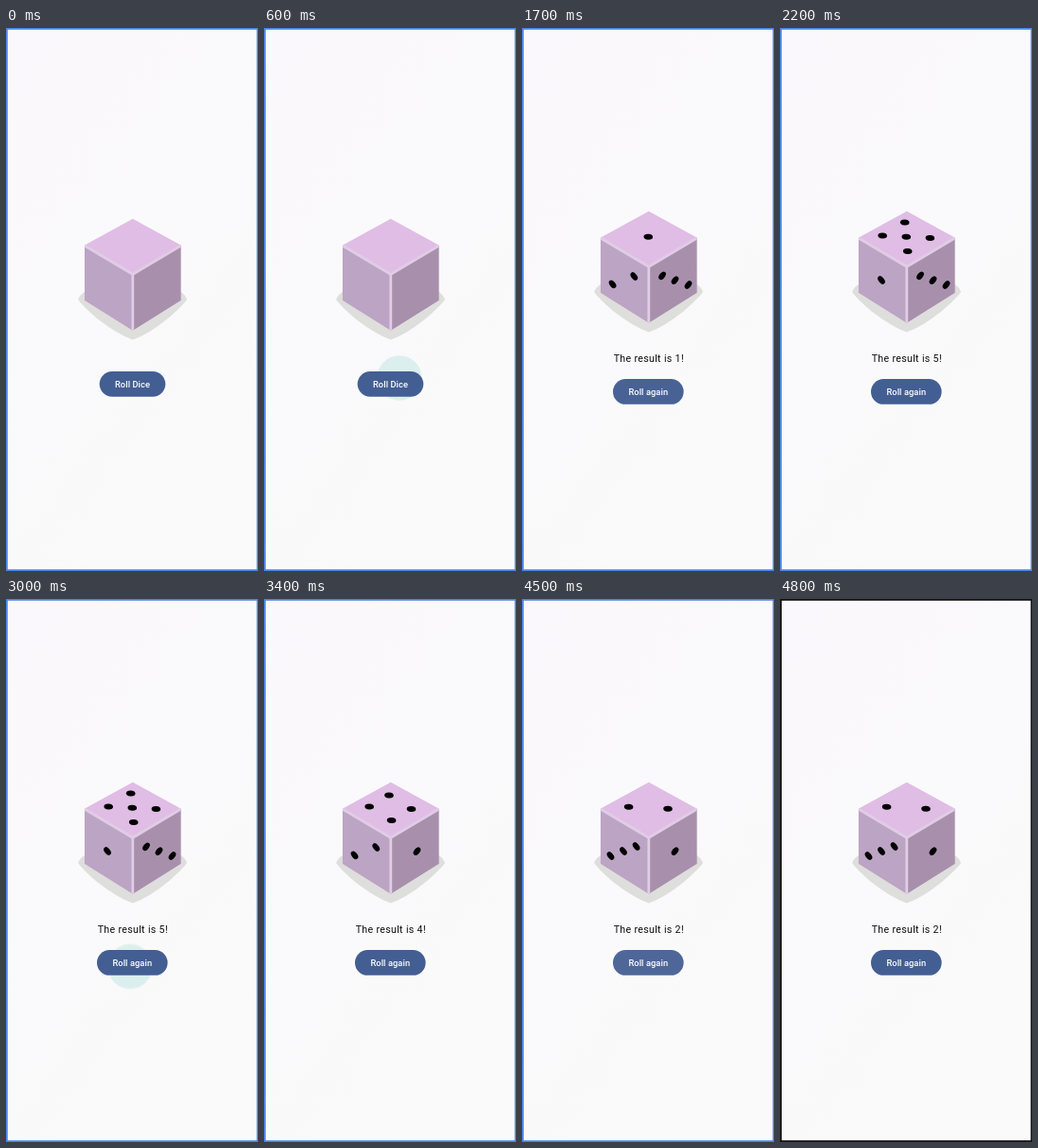
An HTML page that plays this animation: 266 px wide and 574 px high, repeating every 5.5 s.

```html
<!DOCTYPE html>
<html lang="en">
<head>
<meta charset="utf-8">
<title>Roll Dice</title>
<style>
  html, body { margin: 0; width: 100%; height: 100%; overflow: hidden; background: #faf9fb; }
  svg { display: block; width: 100vw; height: 100vh; }
  text { font-family: Roboto, "Open Sans", sans-serif; text-anchor: middle; }
  .label { font-size: 9.3px; font-weight: 500; letter-spacing: .07px; fill: #fff; }
  .result { font-size: 10.64px; letter-spacing: .33px; fill: #101010; }
  .timed { animation: 5.5s step-end infinite; }

  .die { animation-name: lift; }
  .start { animation-name: start; }
  .after { animation-name: after; }
  .one { animation-name: one; }
  .five { animation-name: five; }
  .four { animation-name: four; }
  .two { animation-name: two; }
  .touch { animation-name: touch; }
  .ripple { animation-name: ripple; }
  .frame { animation-name: frame; }

  @keyframes lift { 0% { transform: translateY(8px); } 12.72%, 100% { transform: none; } }
  @keyframes start { 0% { opacity: 1; } 12.72%, 100% { opacity: 0; } }
  @keyframes after { 0% { opacity: 0; } 12.72%, 100% { opacity: 1; } }
  @keyframes one { 0% { opacity: 0; } 12.72% { opacity: 1; } 34.54%, 100% { opacity: 0; } }
  @keyframes five { 0% { opacity: 0; } 34.54% { opacity: 1; } 56.36%, 100% { opacity: 0; } }
  @keyframes four { 0% { opacity: 0; } 56.36% { opacity: 1; } 78.18%, 100% { opacity: 0; } }
  @keyframes two { 0% { opacity: 0; } 78.18%, 100% { opacity: 1; } }

  @keyframes touch {
    0% { opacity: 0; transform: translate(110px, 370px); }
    1.81% { opacity: .3; transform: translate(110px, 370px); }
    3.63% { opacity: .4; transform: translate(117px, 370px); }
    5.45% { opacity: .5; transform: translate(124px, 370px); }
    7.27% { opacity: .6; transform: translate(131px, 370px); }
    9.09% { opacity: .8; transform: translate(138px, 370px); }
    10.9% { opacity: 1; transform: translate(143px, 370px); }
    12.72% { opacity: 0; }
    32.72% { opacity: 1; transform: translate(131px, 376.5px); }
    34.54% { opacity: 0; }
    54.54% { opacity: 1; transform: translate(131px, 388.5px); }
    56.36% { opacity: 0; }
    76.36% { opacity: 1; transform: translate(130.5px, 390px); }
    78.18%, 100% { opacity: 0; }
  }

  @keyframes ripple {
    0% { opacity: 0; transform: translate(138px, 383px) scale(.6); }
    12.72% { opacity: .14; transform: translate(138px, 383px) scale(.6); }
    14.54% { opacity: .14; transform: translate(138px, 383px); }
    16.36% { opacity: .12; transform: translate(135px, 384px) scale(1.8); }
    18.18% { opacity: .07; transform: translate(133px, 384px) scale(1.8); }
    20% { opacity: .03; transform: translate(133px, 384px) scale(1.8); }
    34.54% { opacity: .14; transform: translate(131px, 384px); }
    38.18% { opacity: .06; transform: translate(133px, 384px) scale(1.8); }
    40% { opacity: 0; }
    56.36% { opacity: .14; transform: translate(131px, 386px); }
    60% { opacity: .06; transform: translate(133px, 384px) scale(1.8); }
    61.81% { opacity: 0; }
    78.18% { opacity: .14; transform: translate(131px, 387px); }
    81.81% { opacity: .06; transform: translate(133px, 384px) scale(1.8); }
    83.63%, 100% { opacity: 0; }
  }

  @keyframes frame { 0% { fill: #4b86e4; } 87.27%, 100% { fill: #111; } }
</style>
</head>
<body>
<svg viewBox="0 0 266 574" preserveAspectRatio="none">
  <defs>
    <linearGradient id="page" x1="0" y1="0" x2=".6" y2="1">
      <stop offset="0" stop-color="#faf8fc"/>
      <stop offset="1" stop-color="#fafafa"/>
    </linearGradient>
    <clipPath id="cube"><path d="M133.8 193.6 184.8 221.5V280L133.8 312 82.8 280V221.5Z"/></clipPath>
    <clipPath id="pill"><rect x="96" y="371" width="74.6" height="26.8" rx="13.4"/></clipPath>
    <ellipse id="t" rx="4.8" ry="3" transform="rotate(3)"/>
    <ellipse id="l" rx="3" ry="4.8" transform="rotate(-38)"/>
    <ellipse id="r" rx="3" ry="4.8" transform="rotate(38)"/>
    <g id="l1"><use href="#l" x="107" y="266.5"/></g>
    <g id="l2"><use href="#l" x="95.6" y="270.8"/><use href="#l" x="118.3" y="262.5"/></g>
    <g id="l3"><use href="#l" x="93.5" y="271.5"/><use href="#l1"/><use href="#l" x="120.6" y="261.5"/></g>
    <g id="r1"><use href="#r" x="161.5" y="266.7"/></g>
    <g id="r3"><use href="#r" x="148" y="261.8"/><use href="#r1"/><use href="#r" x="175.5" y="271.5"/></g>
  </defs>

  <rect width="266" height="574" fill="url(#page)"/>

  <g class="timed die">
    <path d="M82.8 271Q77 275 76.2 279.3Q82 287 96 299Q118 316 133.8 321.6Q150 316 171 299Q185 287 191 279.3Q190 275 184.8 271Z" fill="#dededc"/>
    <g clip-path="url(#cube)">
      <path d="M82.8 221.5 133.8 193.6 184.8 221.5 133.8 252Z" fill="#e0bde5"/>
      <path d="M82.8 221.5 133.8 252V312L82.8 280Z" fill="#bca4c4"/>
      <path d="M184.8 221.5 133.8 252V312L184.8 280Z" fill="#a890ad"/>
      <path d="M82.8 222 133.8 252.3 184.8 222M133.8 252V312" fill="none" stroke="#e0cde5" stroke-width="2.8"/>
    </g>
  </g>

  <g class="timed one">
    <use href="#t" x="133.3" y="220.8"/>
    <use href="#l2"/><use href="#r3"/>
    <text class="result" x="133.8" y="353">The result is 1!</text>
  </g>
  <g class="timed five">
    <use href="#t" x="131.7" y="205.6"/><use href="#t" x="108.2" y="219.5"/>
    <use href="#t" x="133.3" y="220.8"/><use href="#t" x="158.4" y="222"/><use href="#t" x="134.7" y="236"/>
    <use href="#l1"/><use href="#r3"/>
    <text class="result" x="133.8" y="353">The result is 5!</text>
  </g>
  <g class="timed four">
    <use href="#t" x="132" y="207.5"/><use href="#t" x="111.2" y="219.6"/>
    <use href="#t" x="155.5" y="221.9"/><use href="#t" x="134.6" y="234"/>
    <use href="#l2"/><use href="#r1"/>
    <text class="result" x="133.8" y="353">The result is 4!</text>
  </g>
  <g class="timed two">
    <use href="#t" x="112.6" y="219.7"/><use href="#t" x="154" y="221.8"/>
    <use href="#l3"/><use href="#r1"/>
    <text class="result" x="133.8" y="353">The result is 2!</text>
  </g>

  <circle class="timed touch" r="23.7" fill="#dcefef"/>

  <g class="timed start">
    <rect x="98.7" y="363" width="69.6" height="26.7" rx="13.35" fill="#435e92"/>
    <text class="label" x="133.5" y="379.8">Roll Dice</text>
  </g>
  <g class="timed after">
    <rect x="96" y="371" width="74.6" height="26.8" rx="13.4" fill="#435e92"/>
    <g clip-path="url(#pill)"><circle class="timed ripple" r="22.5" fill="#fff"/></g>
    <text class="label" x="133.3" y="387.8">Roll again</text>
  </g>

  <path class="timed frame" fill-rule="evenodd" d="M0 0H266V574H0ZM1.8 1.8V572.3H264.6V1.8Z"/>
</svg>
</body>
</html>
```
